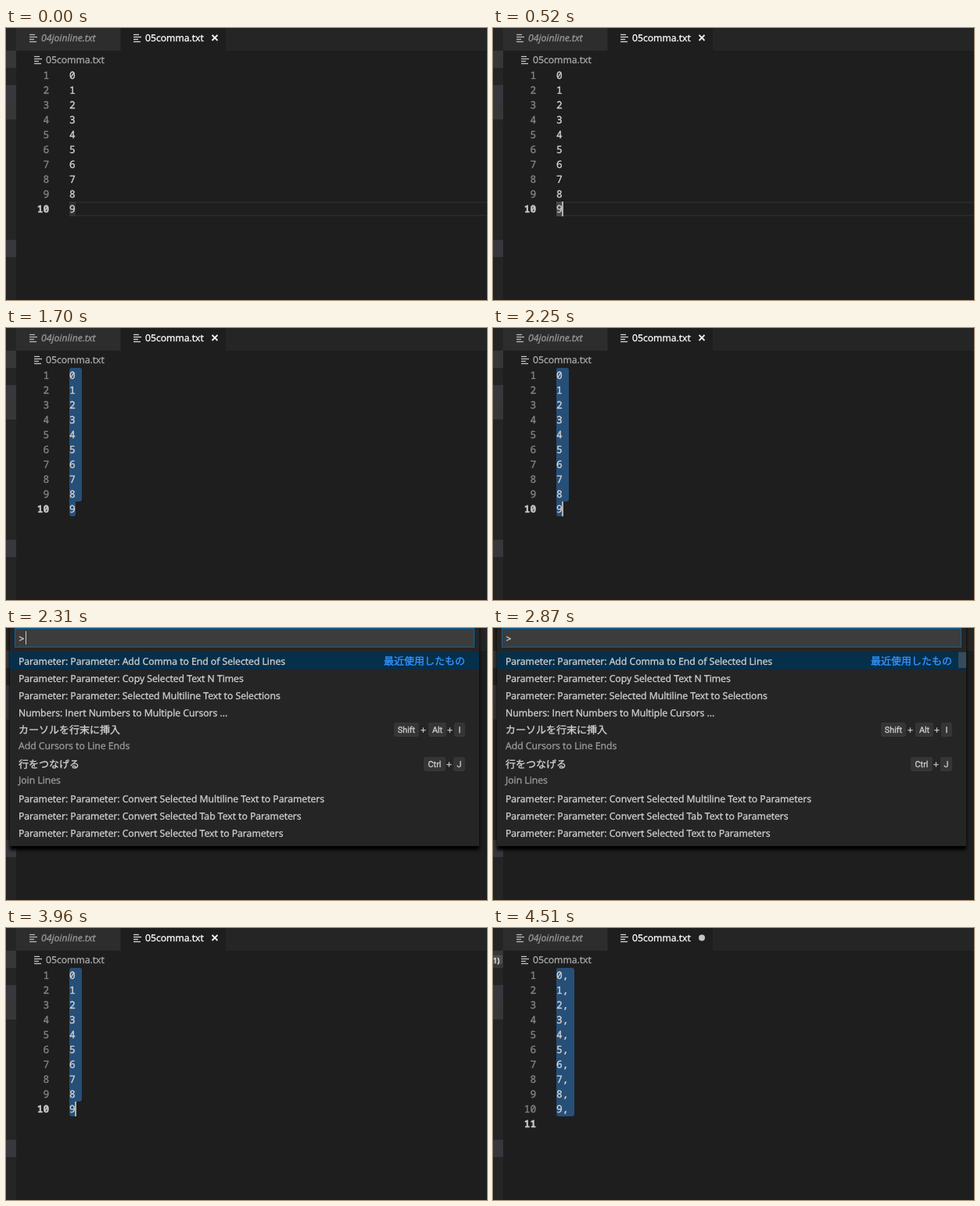
Write an HTML page with a canvas that moves like this. It is 615 px wide and 348 px high and loops after 4660 ms.

```html
<!DOCTYPE html>
<html lang="ja">
<head>
<meta charset="utf-8">
<title>Add commas to lines</title>
<style>
html, body { margin: 0; width: 100%; height: 100%; overflow: hidden; background: #1e1e1e; }
canvas { display: block; }
</style>
</head>
<body>
<canvas id="stage" width="615" height="348"></canvas>
<script>
const ctx = document.getElementById('stage').getContext('2d');
const LOOP = 4660;
const UI = '12.2px "Open Sans", "Noto Sans", sans-serif';
const CJK = '13px "Noto Sans CJK JP", "Noto Sans CJK", sans-serif';
const KEY = '10.8px Roboto, "Open Sans", sans-serif';
const MONO = '12.83px "Noto Sans Mono", monospace';
const LINE = 19, TOP = 51, LEFT = 81;

const within = (t, a, b) => t >= a && t < b;

function rect(color, x, y, w, h) {
  ctx.fillStyle = color;
  ctx.fillRect(x, y, w, h);
}

function round(color, x, y, w, h, r) {
  ctx.fillStyle = color;
  ctx.beginPath();
  ctx.roundRect(x, y, w, h, r);
  ctx.fill();
}

// A hairline stroke gives the glyphs a slightly heavier weight.
function text(str, x, y, color, font = UI, align = 'left') {
  ctx.font = font;
  ctx.fillStyle = ctx.strokeStyle = color;
  ctx.textAlign = align;
  ctx.lineWidth = 0.35;
  ctx.fillText(str, x, y);
  ctx.strokeText(str, x, y);
}

function fileIcon(x, y, color) {
  [7, 10, 6, 9].forEach((w, i) => rect(color, x, y + i * 3 - 0.1, w, 1.3));
}

function sidebar(t) {
  rect('#252526', 0, 0, 13, 348);
  rect('#373738', 0, 29, 13, 22);
  rect('#37373d', 0, 73, 13, 22);
  rect('#373738', 0, 95, 13, 22);
  rect('#37373d', 0, 271, 13, 22);
  if (t >= 4260) {
    rect('#4d4d4d', 0, 35, 12, 11);
    text('1)', 0, 44.5, '#fff', '9.5px "Open Sans", sans-serif');
  }
}

function tabs(edited) {
  rect('#252526', 13, 0, 602, 29);
  rect('#2d2d2d', 13, 0, 133, 29);
  rect('#1e1e1e', 147, 0, 134, 29);
  fileIcon(30, 8, '#b5b8b9');
  text('04joinline.txt', 45, 17, '#969696', 'italic ' + UI);
  fileIcon(163, 8, '#d4d7d6');
  text('05comma.txt', 178, 17, '#fff');
  if (edited) {
    round('#c5c5c5', 263, 8.5, 8, 8, 4);
  } else {
    ctx.strokeStyle = '#f0f0f0';
    ctx.lineWidth = 1.8;
    ctx.beginPath();
    ctx.moveTo(263.5, 9);
    ctx.lineTo(270.5, 16);
    ctx.moveTo(270.5, 9);
    ctx.lineTo(263.5, 16);
    ctx.stroke();
  }
  fileIcon(36, 36, '#c0c3c2');
  text('05comma.txt', 51, 45, '#a9a9a9');
}

function editor(t) {
  const edited = t >= 4040, selected = t >= 1240;
  rect('#1e1e1e', 0, 0, 615, 348);
  sidebar(t);
  tabs(edited);

  if (edited) {
    round('#264f78', LEFT, TOP, 23, LINE * 10, 3);
  } else if (selected) {
    round('#264f78', LEFT, TOP, 16, LINE * 9, [3, 3, 3, 0]);
    round('#264f78', LEFT, 222, 8, LINE, [0, 0, 3, 3]);
  } else {
    rect('#282828', LEFT, 222, 534, 2);
    rect('#282828', LEFT, 239, 534, 2);
    rect(t < 520 ? '#303232' : '#474949', LEFT, 222, 8, LINE);
  }

  const count = edited ? 11 : 10;
  for (let i = 0; i < count; i++) {
    const y = TOP + i * LINE + 14, active = i === count - 1;
    text(String(i + 1), 55.2, y, active ? '#c6c6c6' : '#858585',
      (active ? 'bold ' : '') + MONO, 'right');
    if (i < 10) text(i + (edited ? ',' : ''), LEFT, y, '#d4d4d4', MONO);
  }

  if (edited) {
    if (t < 4510) rect('#aeafad', LEFT, 241, 2, LINE);
  } else if (within(t, 520, 1070) || within(t, 1240, 1700) || t >= 2250) {
    rect('#aeafad', 88, 222, 2, LINE);
  }
}

function key(label, x, y, w) {
  round('#3c3c3d', x, y, w, 18, 3);
  round('#353536', x, y, w, 17, 3);
  text(label, x + w / 2, y + 13, '#ccc', KEY, 'center');
}

function palette(t) {
  ctx.save();
  ctx.shadowColor = '#000';
  ctx.shadowBlur = 4;
  ctx.shadowOffsetY = 5;
  rect('#252526', 5, -10, 600, 289);
  ctx.restore();

  rect('#3c3c3c', 11, 0, 588, 25);
  ctx.strokeStyle = '#0a64a4';
  ctx.lineWidth = 1;
  ctx.strokeRect(11.5, 0.5, 587, 24);
  text('>', 16.5, 17.5, '#ccc');
  if (t < 2780 || within(t, 3330, 3880)) rect('#ccc', 25, 4, 1, 17);

  rect('#062f4a', 5, 31, 600, 22);
  const pre = 'Parameter: Parameter: ';
  const rows = [
    [32, pre + 'Add Comma to End of Selected Lines'],
    [54, pre + 'Copy Selected Text N Times'],
    [76, pre + 'Selected Multiline Text to Selections'],
    [98, 'Numbers: Inert Numbers to Multiple Cursors ...'],
    [120, 'カーソルを行末に挿入', 'Add Cursors to Line Ends'],
    [164, '行をつなげる', 'Join Lines'],
    [208, pre + 'Convert Selected Multiline Text to Parameters'],
    [230, pre + 'Convert Selected Tab Text to Parameters'],
    [252, pre + 'Convert Selected Text to Parameters']
  ];
  for (const [y, label, detail] of rows) {
    text(label, 16, y + 15, '#d0d0d0', detail ? CJK : UI);
    if (detail) text(detail, 16, y + 35, '#9a9a9a');
  }
  text('最近使用したもの', 587, 47, '#3794ff', CJK, 'right');

  key('Shift', 496, 121, 32);
  key('Alt', 540, 121, 23);
  key('I', 573, 121, 14);
  key('Ctrl', 534, 165, 28);
  key('J', 572, 165, 15);
  for (const [x, y] of [[533.5, 135], [567.5, 135], [566.5, 179]]) {
    text('+', x, y, '#ccc', UI, 'center');
  }
  if (t >= 2870) rect('rgba(121,121,121,0.4)', 595, 31, 10, 20);
}

function draw(t) {
  ctx.textRendering = 'geometricPrecision';
  ctx.lineJoin = 'round';
  editor(t);
  if (within(t, 2310, 3960)) palette(t);
}

let start;
function tick(now) {
  start ??= now;
  draw((now - start) % LOOP);
  requestAnimationFrame(tick);
}
draw(0);
requestAnimationFrame(tick);
</script>
</body>
</html>
```
